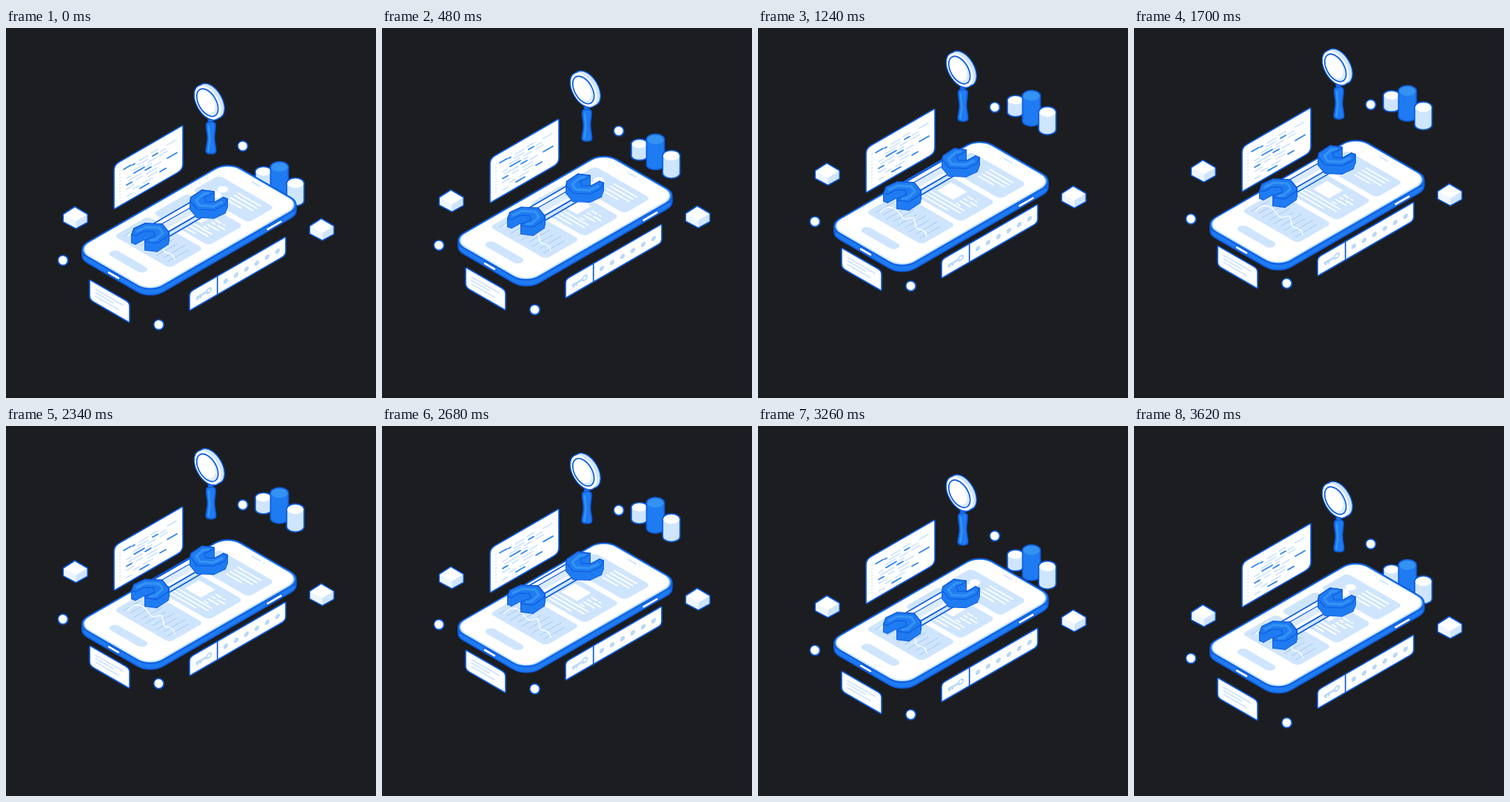
Recreate the animation shown at these times as an HTML page. Size 500 by 500 pixels, loop 3980 ms.

```html
<!DOCTYPE html>
<html lang="en">
<head>
<meta charset="utf-8">
<title>Floating phone toolkit</title>
<style>
html, body { margin: 0; width: 100%; height: 100%; overflow: hidden; background: #1c1d21; }
svg { display: block; width: 100vw; height: 100vh; }
.o { stroke: #0d5ce0; stroke-width: 1.7; stroke-linejoin: round; }
.o, .l { vector-effect: non-scaling-stroke; }
.w { fill: #fff; }
.p { fill: #cfe5fd; }
.b { fill: #1f7bf1; }
.h { fill: #3492f3; }
.l { fill: none; stroke: #cfe5fd; stroke-width: 1.8; stroke-linecap: round; }
.l.white { stroke: #fff; }
.l.blue { stroke: #2f86ea; }
.l.grid { stroke: #a3caf2; stroke-width: 1; }
.slot { stroke-width: 5; stroke-linecap: round; }
.l.pill { stroke-width: 2.8; }
</style>
</head>
<body>
<svg viewBox="0 0 500 500">
  <rect width="500" height="500" fill="#1c1d21"/>

  <g data-rise="24">
    <g transform="matrix(1 -.577 0 1 146 185)">
      <path class="o w" d="M7 0H91Q93 0 93 2V53Q93 60 86 60H2Q0 60 0 58V7Q0 0 7 0Z"/>
      <g id="code"></g>
    </g>
  </g>

  <g data-rise="103" id="cylinders"></g>

  <g data-rise="47">
    <rect class="o b" x="273.6" y="120" width="5.8" height="12"/>
    <path class="o b" d="M270.7 131Q270.7 127 276.8 127Q283 127 283 131C283 140 281 143 281.6 150C282 157 283.6 161 283.6 166Q283.6 170 277 170Q270.3 170 270.3 166C270.3 161 272 157 272.4 150C272.8 143 270.7 140 270.7 131Z"/>
    <path d="M274 133C274 142 275.5 145 275.3 151C275 158 273.6 162 273.6 166" fill="none" stroke="#3492f3" stroke-width="2.6" stroke-linecap="round"/>
    <circle class="o p" r="21" transform="matrix(.866 .5 0 1 277 98.6)"/>
    <circle class="o w" r="21" transform="matrix(.866 .5 0 1 272.6 100.8)"/>
    <circle class="p" r="20.4" transform="matrix(.866 .5 0 1 276.8 98.6)"/>
    <circle class="w" r="20.4" transform="matrix(.866 .5 0 1 272.7 100.7)"/>
    <circle fill="#dcebfd" r="16.7" transform="matrix(.866 .5 0 1 272.2 100.8)"/>
    <circle class="w" r="14" transform="matrix(.866 .5 0 1 270.5 99.5)"/>
    <circle class="o" r="16.7" fill="none" transform="matrix(.866 .5 0 1 272.2 100.8)"/>
  </g>

  <g data-rise="34">
    <g transform="matrix(.866 -.5 .866 .5 92.9 307.6)">
      <rect class="o b" width="239" height="118" rx="20"/>
    </g>
    <path class="o b" d="M103 299.6L392 239V247L103 307.6Z"/>
    <g transform="matrix(.866 -.5 .866 .5 92.9 299.6)" id="screen">
      <rect class="o h" width="239" height="118" rx="20"/>
      <rect class="p" x="1.6" y="1.4" width="235.6" height="114.6" rx="19"/>
      <rect class="w" x="3.8" y="2.2" width="232.6" height="111.6" rx="17.5"/>
      <rect class="p" x="19.5" y="31" width="12.5" height="54" rx="6"/>
      <rect class="p" x="49" y="12" width="53" height="87" rx="6"/>
      <rect class="p" x="110" y="12" width="54" height="87" rx="6"/>
      <rect class="p" x="172" y="12" width="41" height="87" rx="6"/>
      <path class="l" d="M230 47V59M230 65V65.5"/>
      <circle class="w" cx="197" cy="34" r="6"/>
      <path class="w" d="M180 25H182A9 9 0 0 1 182 43H180Z"/>
      <path class="l white" d="M204 51V86M198 51V86M192 51V86M186 51V74"/>
      <rect class="w" x="134" y="38" width="22" height="25"/>
      <path class="l white" d="M128 30V86M122 30V86M116 30V72M150 70V78M150 82V84M144 70V75M144 79V90M138 70V86M132 70V76"/>
      <g id="grid"></g>
    </g>
    <path class="l white" style="stroke-width:1.4" d="M165 281C171 273 179 272 186 277S195 292 202 290S210 284 212 294S214 303 219 304S227 307 228 313"/>
    <path class="o slot" d="M139 330.5L152 338"/>
    <path class="l white pill" d="M139 330.5L152 338"/>
    <path class="o slot" d="M353.5 272L371.5 261.6"/>
    <path class="l white pill" d="M353.5 272L371.5 261.6"/>
  </g>

  <g data-rise="47">
    <g transform="matrix(1 -.577 0 1 248 357)">
      <path class="o w" d="M5 0H128Q130 0 130 2V20Q130 25 125 25H2Q0 25 0 23V5Q0 0 5 0Z"/>
      <path class="o" d="M37.7 0V25"/>
      <g id="dots"></g>
      <g fill="none" stroke="#b9d8f8" stroke-linecap="round">
        <circle cx="26" cy="12.8" r="3" stroke-width="2.2"/>
        <path d="M10 13H22M11 13V15.5M15 13V15.5" stroke-width="3"/>
      </g>
    </g>
  </g>

  <g data-rise="46">
    <g transform="matrix(1 .577 0 1 113 340)">
      <path class="o w" d="M2 0H49Q54 0 54 5V25Q54 27 52 27H5Q0 27 0 22V2Q0 0 2 0Z"/>
      <path class="l" d="M8 8.5H45M8 13H32M8 18H39"/>
    </g>
  </g>

  <g data-rise="63" class="cube" data-x="77" data-y="241.5"></g>
  <g data-rise="47" class="cube" data-x="410" data-y="257.5"></g>

  <g data-rise="56" id="balls"></g>

  <g data-rise="60" id="wrench">
    <path class="o p" d="M220 275L268 247V254L220 282Z"/>
    <path class="o w" d="M200 264L250 235L270 246L220 275Z"/>
    <path fill="#dcebfd" d="M205 268L253 240.5L262 245.5L214 273Z"/>
    <path class="o" fill="none" style="stroke-width:1.2" d="M205 268L253 240.5"/>
  </g>
</svg>

<script>
const $ = id => document.getElementById(id);
const add = (node, markup) => node.insertAdjacentHTML('beforeend', markup);
const range = (n, fn) => Array.from({ length: n }, (_, i) => fn(i)).join('');

// code listing: "x y length" runs
const runs = (text, cls) => {
  const d = text.split(',').map(s => {
    const [x, y, len] = s.trim().split(' ');
    return `M${x} ${y}h${len}`;
  }).join('');
  add($('code'), `<path class="l ${cls}" d="${d}"/>`);
};
runs('34 14 12, 50 13 9, 72 14.5 12, 32 18.5 14, 62 18.5 8, 26 22.5 14, 46 23 10, 62 23 10, ' +
     '17 28 6, 45 27.5 6, 20 32.5 18, 54 32.5 10, 30 37.5 8, 44 37.5 14, ' +
     '17 42.5 10, 46 42.5 12, 26 47.5 8, 40 47.5 12, 17 52.5 7', '');
runs('13 13.5 10, 25 14.4 3, 52 18 7, 27 26.6 14, 42 31.5 8, 72 32.5 13, 17 37 7, 62 45 8, 35 52 12', 'blue');
add($('code'), `<path d="M8 12V54" fill="none" stroke="#cfe5fd" stroke-width="2" stroke-dasharray="1.6 3"/>`);

// cylinders
const cylinder = (x, y, rx, ry, h, side, top) => add($('cylinders'),
  `<path class="o ${side}" d="M${x - rx} ${y}v${h}a${rx} ${ry} 0 0 0 ${2 * rx} 0v${-h}Z"/>` +
  `<ellipse class="${top}" cx="${x}" cy="${y}" rx="${rx - .6}" ry="${ry}"/>` +
  `<path class="o" fill="none" d="M${x - rx} ${y}a${rx} ${ry} 0 0 1 ${2 * rx} 0"/>`);
cylinder(348, 193.5, 11, 6, 16.5, 'p', 'w');
cylinder(369.5, 187.5, 12, 6.8, 34.5, 'b', 'h');
cylinder(391, 209.5, 11.7, 6.8, 24, 'p', 'w');

// phone chart and password dots
add($('grid'), range(9, i => `<path class="l grid" d="M${56 + i % 2 * 3} ${20 + i * 8.6}H${84 + i * 5 % 9}"/>`));
add($('dots'), range(6, i => `<circle cx="${49 + 14 * i}" cy="13.2" r="3.1" fill="#b9d8f8"/>`));

// cubes and balls
for (const g of document.querySelectorAll('.cube')) {
  add(g, `<g transform="translate(${g.dataset.x} ${g.dataset.y})">
    <path class="o w" d="M16 0L33 10V21L17.5 29.5L.5 20.5V10Z"/>
    <path fill="#eef6ff" d="M1.2 10.6L17.5 19.5V28.6L1.2 20Z"/>
    <path class="p" d="M32.3 10.6L17.5 19.5V28.6L32.3 20.5Z"/></g>`);
}
for (const [x, y] of [[320, 159.5], [77, 314], [206.5, 401]]) {
  add($('balls'), `<circle class="o" fill="#e6f1fe" cx="${x}" cy="${y}" r="6.7"/>` +
    `<circle class="w" cx="${x - .6}" cy="${y - .6}" r="5.2"/>`);
}

// wrench heads: polygons pushed downwards, outline behind the walls
const toPath = pts => 'M' + pts.map(p => p.join(' ')).join('L');
const prism = (pts, h) => {
  const walls = pts.map((a, i) => [a, pts[(i + 1) % pts.length]])
    .map(([a, b]) => toPath([a, b, [b[0], b[1] + h], [a[0], a[1] + h]]) + 'Z');
  for (const cls of ['o b', 'b']) {
    for (const d of walls) add($('wrench'), `<path class="${cls}" d="${d}"/>`);
  }
  add($('wrench'), `<path class="o b" style="stroke-width:1.2" d="${toPath(pts)}Z"/>`);
};
const jaw = [[170, 279], [173, 271], [188, 264], [211, 265], [220, 276], [219, 281],
  [204, 291], [188, 289], [188, 287], [201, 281], [199, 275], [186, 275], [175, 281]];
const ridge = [[176, 275], [189, 269], [207, 270], [212, 277], [202, 286], [194, 287]];
const flip = pts => pts.map(([x, y]) => [469 - x, 510 - y]);
for (const turn of [flip, pts => pts]) {
  prism(turn(jaw), 11);
  add($('wrench'), `<path d="${toPath(turn(ridge))}" fill="none" stroke="#3492f3" stroke-width="3.4" stroke-linejoin="round"/>`);
}

// motion
const LOOP = 3980, MOVE = 3620, HALF = MOVE / 2;
const ease = x => {
  let lo = 0, hi = 1;
  for (let i = 0; i < 24; i++) {
    const s = (lo + hi) / 2, r = 1 - s;
    if (3 * r * r * s * .328 + 3 * r * s * s * .193 + s ** 3 < x) lo = s; else hi = s;
  }
  return lo * lo * (3 - 2 * lo);
};
const parts = [...document.querySelectorAll('[data-rise]')];
const draw = ms => {
  const t = Math.min(Math.floor(ms % LOOP / 20) * 20, MOVE);
  const lift = ease(1 - Math.abs(t - HALF) / HALF);
  for (const g of parts) g.setAttribute('transform', `translate(0 ${(-g.dataset.rise * lift).toFixed(2)})`);
};
const start = performance.now();
const tick = () => {
  draw(performance.now() - start);
  requestAnimationFrame(tick);
};
tick();
</script>
</body>
</html>
```
